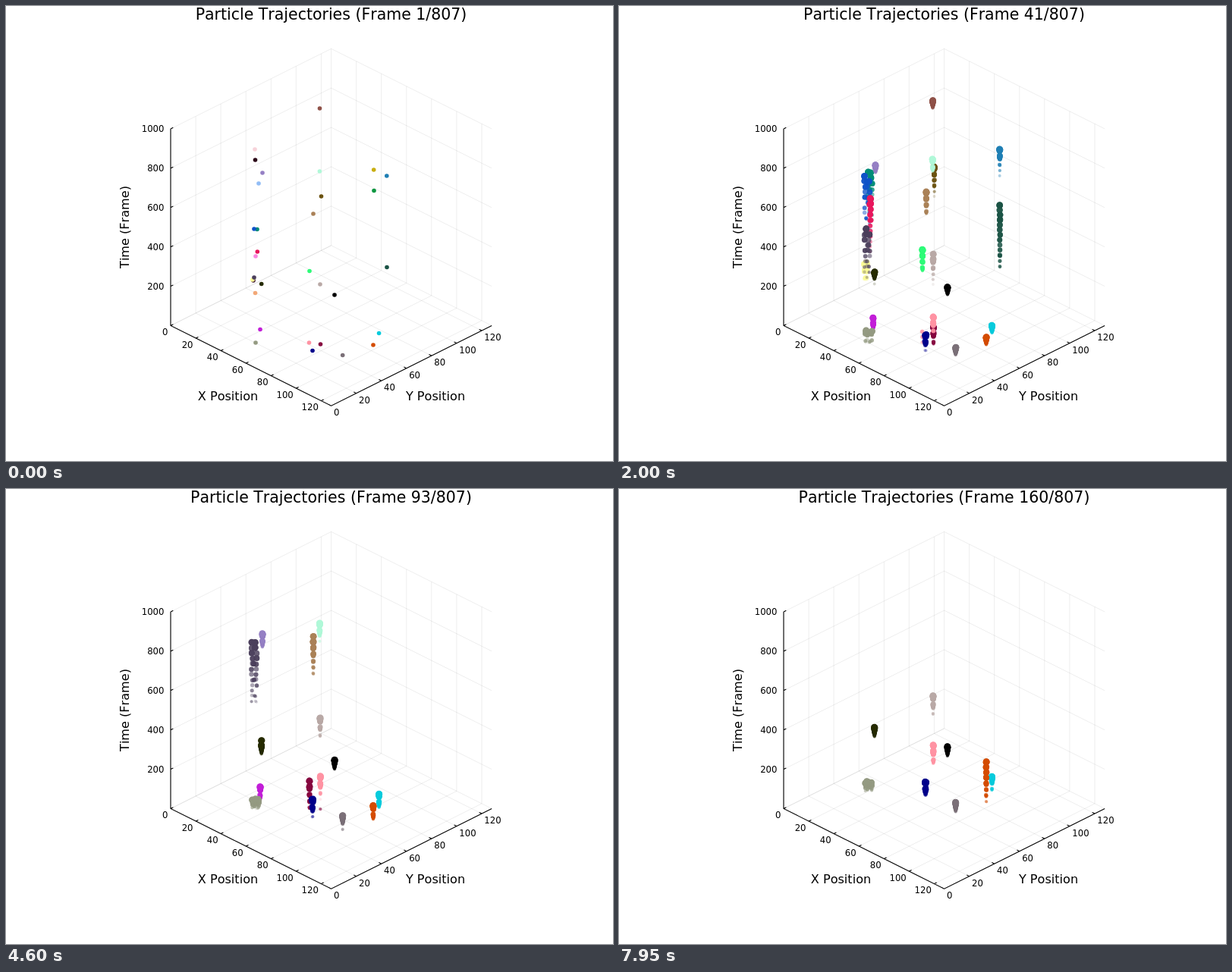
An HTML page for the animation above (8 s loop, 800 px wide and 600 px high).

```html
<!DOCTYPE html>
<html lang="en">
<head>
<meta charset="utf-8">
<title>Particle Trajectories</title>
<style>
  html, body { margin: 0; width: 100%; height: 100%; overflow: hidden; background: #fff; }
  svg { display: block; width: 100vw; height: 100vh; }
  text { font-family: "DejaVu Sans", sans-serif; font-size: 11.7px; font-kerning: none; }
  .label { font-size: 16.1px; }
  .title { font-size: 20.5px; }
  .mid { text-anchor: middle; }
  .end { text-anchor: end; }
  #grid { stroke: #000; stroke-opacity: .1; stroke-width: .7; fill: none; }
  #axes { stroke: #000; stroke-width: 1.1; fill: none; }
</style>
</head>
<body>
<svg viewBox="0 0 800 600">
  <rect width="800" height="600" fill="#fff"/>
  <path id="grid"/>
  <path id="axes"/>
  <g id="ticks"></g>
  <text class="label mid" x="292.5" y="519.5">X Position</text>
  <text class="label mid" x="566" y="519.5">Y Position</text>
  <text class="label mid" transform="translate(161.5 291.5) rotate(-90)">Time (Frame)</text>
  <g id="dots"></g>
  <text class="title mid" id="title" x="428.5" y="18"></text>
</svg>
<script>
const $ = id => document.getElementById(id);
const FRAME_MS = 50, FRAMES = 160, TRAIL = 50;
const RISE = 0.26; // pixels per time step

// Projection: x runs down-right, y runs up-right, z runs up
const project = (x, y, z) => [
  217 + (x + y) * 211.6 / 128,
  421.5 + (x - y) * 105.7 / 128 - z * 0.2595
];
const line = (...pts) => 'M' + pts.map(p => project(...p).map(v => v.toFixed(1))).join('L');

function drawAxes() {
  const M = 128, T = 1000, tick = 2;
  let grid = '', axes = line([0, 0, T], [0, 0, 0], [M, 0, 0], [M, M, 0]), text = '';
  const label = (cls, x, y, v) => {
    text += `<text class="${cls}" x="${x}" y="${y + 4.3}">${v}</text>`;
  };
  for (let k = 0; k <= 6; k++) {
    const v = k * 20;
    grid += line([v, 0, 0], [v, M, 0], [v, M, T]) + line([M, v, 0], [0, v, 0], [0, v, T]);
    axes += line([v, 0, 0], [v, tick, 0]) + line([M, v, 0], [M - tick, v, 0]);
    label('end', 213.5 + 33.06 * k, 430 + 16.5 * k, v);
    label('', 432 + 33.06 * k, 536 - 16.5 * k, v);
  }
  for (let z = 0; z <= T; z += 200) {
    grid += line([0, 0, z], [0, M, z], [M, M, z]);
    if (!z) continue;
    axes += line([0, 0, z], [0, tick, z]);
    label('end', 208.5, project(0, 0, z)[1], z);
  }
  $('grid').setAttribute('d', grid);
  $('axes').setAttribute('d', axes);
  $('ticks').innerHTML = text;
}

// A particle drifts up steadily and gains extra height in uneven hops over its life.
// ease < 1 hops early, ease > 1 hops late; sway scatters it sideways.
const tracks = [];
const lasting = life => (color, x, y, gain = 0, ease = 1, sway = 0.3) => {
  const hops = Math.max(1, Math.round(gain / 6));
  const at = n => {
    const baseX = typeof x === 'function' ? x(n) : x;
    const q = hops * ((n - 1) / (life - 1)) ** ease;
    const hop = Math.floor(q + 0.5 + 0.3 * Math.sin(q * 1.9 + y));
    const dx = n > 1 ? sway * Math.sin(Math.floor(n / 3) * 2.4 + y) : 0;
    return [baseX + dx, y - RISE * (n - 1) - gain * hop / hops];
  };
  tracks.push({ color, life, at });
};
const moveAt = (step, from, to) => n => n < step ? from : to;

function addParticles() {
  const flash = lasting(9), brief = lasting(28), short = lasting(56),
        medium = lasting(105), long = lasting(138), full = lasting(FRAMES);
  flash('#f7d3da', 328, 189);
  flash('#0a9640', 485, 243.5);

  brief('#2a0517', 328.5, 203, 0, 1, 4);
  brief('#92bdf5', 333, 234);
  brief('#3a0f28', 326, 362, 36, 0.8);
  brief('#f987e0', 329, 330, 8, 1, 3);
  brief('#f2a878', 328.5, 378.5, 7, 1, 4);
  brief('#c8ae10', 484.7, 216, 8, 0.5);

  short('#8f5148', 413.5, 135);
  short('#008c78', 331, 294.5, 77, 0.5, 3);
  short('#0e52c8', 327, 294, 83, 1, 3.5);
  short('#e8175d', 331.3, 324, 78, 0.8, 0.8);
  short('#fafa96', 325, 361, 18, 1, 2);
  short('#6b5210', 415.5, 251, 40, 0.65);
  short('#2dfb78', 400, 349.5, 36, 2);
  short('#1f7fb4', 501.8, 224, 31, 0.5);
  short('#1b5345', 502, 344.5, 125, 1.75);

  medium('#4b3f5c', 327, 358, 150, 1, 3.5);
  medium('#c21ed8', 335, 426.5, 10, 1.3);
  medium('#aa8157', 405, 274, 62, 1.3);

  long('#9580c4', 338, 220, 16, 4);
  long('#b0f8d8', 413.4, 218, 23);
  long('#86063f', moveAt(48, 414.5, 400), 446, 68, 1.5);

  full('#262b00', 336.7, 366.5, 11, 0.25);
  full('#949a82', 329, 444, 17, 0.6, 4.5);
  full('#b9a9a6', 414, 367, 53, 0.45);
  full('#000000', 433, 381);
  full('#ff93a3', moveAt(14, 399.5, 414.3), 444, 65, 0.7);
  full('#00008b', 404, 454.5, 27, 0.6, 0.8);
  full('#7b7078', 443.7, 460.5, 6);
  full('#06cbdc', 491.6, 431.5, 11, 1.4);
  full('#d44c00', 484, 447, 46, 4.5);
}

// Trails grow in size and opacity towards the head
function drawTrail({ color, life, at }, frame) {
  if (frame > life) return '';
  const count = Math.min(frame, TRAIL);
  let out = `<g fill="${color}">`;
  for (let i = 1; i <= count; i++) {
    const [x, y] = at(frame - count + i);
    const u = count > 1 ? (i - 1) / (count - 1) : 1;
    const r = count > 1 ? 1.9 + 2.5 * u : 2.8;
    out += `<circle cx="${x.toFixed(1)}" cy="${y.toFixed(1)}" r="${r.toFixed(2)}" fill-opacity="${(0.2 + 0.8 * u).toFixed(2)}"/>`;
  }
  return out + '</g>';
}

const start = performance.now();
let shown = 0;

function update() {
  const t = Math.max(0, performance.now() - start);
  const frame = Math.floor(t / FRAME_MS) % FRAMES + 1;
  if (frame !== shown) {
    shown = frame;
    $('title').textContent = `Particle Trajectories (Frame ${frame}/807)`;
    $('dots').innerHTML = tracks.map(track => drawTrail(track, frame)).join('');
  }
  requestAnimationFrame(update);
}

drawAxes();
addParticles();
update();
</script>
</body>
</html>
```
